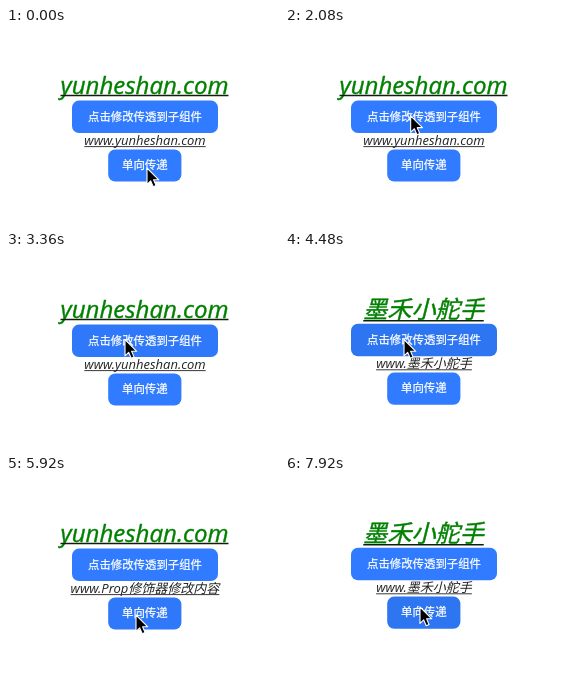
Animation of 273x196 px, one loop 8 s. Source, as an HTML page:

```html
<!DOCTYPE html>
<html lang="zh">
<head>
<meta charset="utf-8">
<style>
  html, body { margin: 0; width: 100%; height: 100%; overflow: hidden; background: #fff; }
  svg { display: block; width: 100vw; height: 100vh; }
  text { text-anchor: middle; font-family: "Open Sans", "Noto Sans CJK SC", "Noto Sans CJK", sans-serif; }
  .italic { font-style: italic; }
  #title { font-size: 24.1px; fill: #008000; stroke: #008000; stroke-width: 0.4; }
  #sub { font-size: 13px; fill: #222; }
  .button { fill: #fff; stroke: #fff; stroke-width: 0.25; font-size: 11.4px;
            font-family: "Noto Sans CJK SC", "Noto Sans CJK", sans-serif; }
</style>
</head>
<body>
<svg viewBox="0 0 273 196">
  <text id="title" class="italic" x="138.5" y="66"></text>
  <line id="titleLine" stroke="#0c200c" stroke-width="1.5"/>
  <g id="content">
    <rect id="topButton" x="66" y="72.6" width="146" height="32.4" rx="7"/>
    <text class="button" x="139" y="92.6">点击修改传透到子组件</text>
    <text id="sub" class="italic" x="139" y="117.2"></text>
    <line id="subLine" stroke="#222" stroke-width="0.9"/>
    <rect id="bottomButton" x="102.2" y="121.4" width="73.2" height="32.2" rx="7"/>
    <text class="button" x="138.8" y="141.2">单向传递</text>
  </g>
  <path id="cursor" d="M0 0V16.4L3.7 12.9L6.2 18.8L9.1 17.6L6.6 11.8H11.8Z"
        fill="#000" stroke="#fff" stroke-width="1.1" stroke-linejoin="round"/>
</svg>
<script>
const LOOP = 8000, STEP = 80, HOLD = 240, FADE = 160;
const SITE = "yunheshan.com", NAME = "墨禾小舵手", EDITED = "Prop修饰器修改内容";
const el = id => document.getElementById(id);

const home = { x: 141, y: 140 };
const moves = [
  { start: 80, end: 880, x: 128, y: 88 },
  { start: 1920, end: 2400, x: 119, y: 87.5 },
  { start: 4720, end: 5440, x: 130, y: 139 },
  { start: 6480, end: 7040, x: 134, y: 90 },
  { start: 7360, end: 7840, x: 135, y: 131 }
];
const topPresses = [2640, 3040, 3920, 4320, 7040];
const bottomPresses = [5600, 7840];

const progress = (t, start, end) => Math.max(0, Math.min(1, (t - start) / (end - start)));
const ease = v => v * v * (3 - 2 * v);
const mix = (a, b, k) => a + (b - a) * k;

function pointerAt(t) {
  const sway = 18 * Math.sin(2 * Math.PI * progress(t, 880, 1520));
  const tip = moves.reduce((from, move) => {
    const k = ease(progress(t, move.start, move.end));
    return { x: mix(from.x, move.x, k), y: mix(from.y, move.y, k) };
  }, home);
  return [tip.x + sway, tip.y];
}

// Each press darkens the button, then fades after release
const pressAt = (presses, t) => Math.max(...presses.map(down =>
  progress(t, down - STEP, down + STEP) * (1 - progress(t, down + HOLD, down + HOLD + FADE))));

const releases = (presses, t) => presses.filter(down => down + HOLD <= t).length;

function paintButton(id, press) {
  const color = [48, 123, 255].map(c => Math.round(c * (1 - 0.05 * press)));
  el(id).setAttribute("fill", `rgb(${color})`);
}

function setText(id, value, lineGap) {
  const text = el(id), line = el(id + "Line");
  if (text.textContent !== value) text.textContent = value;
  const x = +text.getAttribute("x"), y = +text.getAttribute("y") + lineGap;
  const half = text.getComputedTextLength() / 2;
  const ends = { x1: x - half, x2: x + half, y1: y, y2: y };
  for (const key in ends) line.setAttribute(key, ends[key]);
}

function render(t) {
  const named = releases(topPresses, t) % 2 === 1;
  const edited = releases(bottomPresses, t) > 0;
  setText("title", named ? NAME : SITE, named ? 2.8 : 1.4);
  setText("sub", "www." + (named ? NAME : edited ? EDITED : SITE), 1.4);
  el("content").setAttribute("transform", `translate(0 ${named ? -0.8 : 0})`);
  paintButton("topButton", pressAt(topPresses, t));
  paintButton("bottomButton", pressAt(bottomPresses, t));
  el("cursor").setAttribute("transform", `translate(${pointerAt(t)})`);
}

const start = performance.now();
function tick() {
  const t = (performance.now() - start) % LOOP;
  render(Math.floor(t / STEP) * STEP);
  requestAnimationFrame(tick);
}
tick();
</script>
</body>
</html>
```
